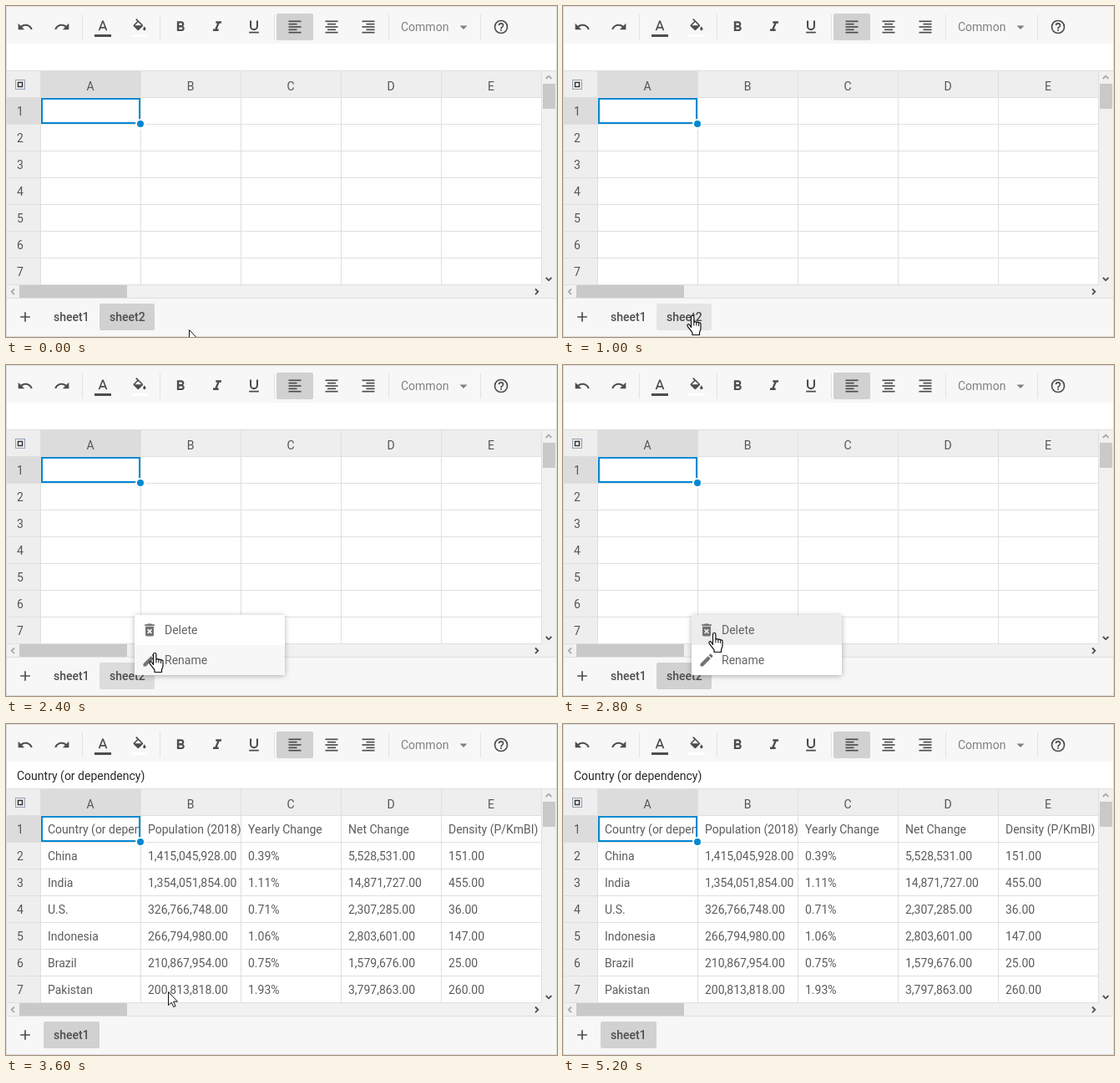
An HTML page for the animation above (6 s loop, 660 by 396 pixels).

```html
<!DOCTYPE html>
<html lang="en">
<head>
<meta charset="utf-8">
<title>Removing a sheet</title>
<style>
  html, body { margin: 0; width: 100%; height: 100%; overflow: hidden; background: #f7f7f7; }
  svg { display: block; width: 660px; height: 396px; font: 14px Roboto, Arial, sans-serif; }
  .tab { font-weight: 500; fill: #4d4d4d; }
  .shadow { filter: drop-shadow(0 1px 3px rgba(0, 0, 0, .3)); }
</style>
</head>
<body>
<svg id="stage" viewBox="0 0 660 396"></svg>
<script>
const stage = document.getElementById("stage");
const INK = "#4d4d4d", LINE = "#dfdfdf", ACTIVE = "#d1d1d1", BLUE = "#0288d1";

function add(parent, tag, attrs, text) {
  const el = document.createElementNS("http://www.w3.org/2000/svg", tag);
  for (const key in attrs) el.setAttribute(key, attrs[key]);
  if (text !== undefined) el.textContent = text;
  parent.appendChild(el);
  return el;
}
const group = (parent = stage) => add(parent, "g", {});
const rect = (x, y, width, height, fill, parent = stage, rx = 0) =>
  add(parent, "rect", { x, y, width, height, fill, rx });
const label = (x, y, text, fill, parent = stage, extra = {}) =>
  add(parent, "text", { x, y, fill, ...extra }, text);
const path = (d, attrs, parent = stage) => add(parent, "path", { d, ...attrs });

// 24-unit icons, drawn 20px wide around a centre point
const ICONS = {
  undo: "M12.5 8C9.85 8 7.45 9 5.6 10.6L2 7V16H11L7.38 12.38C8.77 11.22 10.54 10.5 12.5 10.5C16.04 10.5 19.05 12.81 20.1 16L22.47 15.22C21.08 11.03 17.15 8 12.5 8Z",
  letter: "M9.62 12L12 5.67L14.37 12M11 3L5.5 17H7.75L8.87 14H15.12L16.25 17H18.5L13 3H11Z",
  fill: "M19 11.5C19 11.5 17 13.67 17 15A2 2 0 0 0 21 15C21 13.67 19 11.5 19 11.5M5.21 10L10 5.21L14.79 10M16.56 8.94L7.62 0L6.21 1.41L8.59 3.79L3.44 8.94C2.85 9.5 2.85 10.47 3.44 11.06L8.94 16.56C9.5 17.1 10.5 17.1 11.06 16.56L16.56 11.06C17.15 10.5 17.15 9.5 16.56 8.94Z",
  bold: "M13.5 15.5H10V12.5H13.5A1.5 1.5 0 0 1 13.5 15.5M10 6.5H13A1.5 1.5 0 0 1 13 9.5H10M15.6 10.79C16.57 10.11 17.25 9 17.25 8C17.25 5.74 15.5 4 13.25 4H7V18H14.04C16.14 18 17.75 16.3 17.75 14.21C17.75 12.69 16.89 11.39 15.6 10.79Z",
  italic: "M10 4V7H12.21L8.79 15H6V18H14V15H11.79L15.21 7H18V4H10Z",
  underline: "M5 21H19V19H5V21M12 17A6 6 0 0 0 18 11V3H15.5V11A3.5 3.5 0 0 1 8.5 11V3H6V11A6 6 0 0 0 12 17Z",
  help: "M11 18H13V16H11V18M12 2A10 10 0 0 0 12 22A10 10 0 0 0 12 2M12 20A8 8 0 0 1 12 4A8 8 0 0 1 12 20M12 6A4 4 0 0 0 8 10H10A2 2 0 0 1 14 10C14 12 11 11.75 11 15H13C13 12.75 16 12.5 16 10A4 4 0 0 0 12 6Z",
  plus: "M19 13H13V19H11V13H5V11H11V5H13V11H19V13Z",
  trash: "M6 19A2 2 0 0 0 8 21H16A2 2 0 0 0 18 19V7H6V19M8.46 11.88L9.87 10.47L12 12.59L14.12 10.47L15.53 11.88L13.41 14L15.53 16.12L14.12 17.53L12 15.41L9.88 17.53L8.47 16.12L10.59 14L8.46 11.88M15.5 4L14.5 3H9.5L8.5 4H5V6H19V4H15.5Z",
  pencil: "M20.71 7.04C21.1 6.65 21.1 6 20.71 5.63L18.37 3.29C18 2.9 17.35 2.9 16.96 3.29L15.12 5.12L18.87 8.87M3 17.25V21H6.75L17.81 9.93L14.06 6.18L3 17.25Z"
};
function icon(name, cx, cy, fill = INK, parent = stage, flip = 1) {
  const s = 20 / 24;
  path(ICONS[name], {
    fill, "fill-rule": "evenodd",
    transform: `translate(${cx} ${cy}) scale(${s * flip} ${s}) translate(-12 -12)`
  }, parent);
}

function drawToolbar() {
  rect(0, 0, 660, 396, "#f7f7f7");
  rect(324, 9, 44, 32, ACTIVE, stage, 2);
  icon("undo", 23, 25);
  icon("undo", 67, 25, INK, stage, -1);
  icon("letter", 116, 25);
  rect(106, 34, 20, 3, INK);
  icon("fill", 160, 25);
  rect(150, 34, 20, 3, "#fff");
  icon("bold", 209, 25);
  icon("italic", 253, 25);
  icon("underline", 297, 25);
  [[346, 0], [390, .5], [434, 1]].forEach(([cx, align]) => {
    for (let i = 0; i < 5; i++) {
      const w = i % 2 ? 10 : 15;
      rect(cx - 7.5 + (15 - w) * align, 17.5 + i * 3.333, w, 1.667, INK);
    }
  });
  for (const x of [91, 184, 321, 458, 568]) rect(x, 10, 1, 30, "#e2e2e2");
  label(473, 30, "Common", "#808080");
  path("M543.5 23.5h9l-4.5 4.5z", { fill: "#808080" });
  icon("help", 593, 25);
}

function drawGrid() {
  rect(0, 45, 660, 32, "#fff");
  rect(0, 77, 660, 1, LINE);
  rect(1, 78, 641, 256, "#eee");
  rect(42, 110, 600, 224, "#fff");
  rect(42, 78, 119, 31, "#dcdcdc");
  rect(1, 110, 40, 31, "#dcdcdc");
  for (let x = 41; x < 650; x += 120) rect(x, 78, 1, 256, LINE);
  for (let y = 109; y < 340; y += 32) rect(1, y, 641, 1, LINE);
  const middle = { "text-anchor": "middle" };
  [..."ABCDE"].forEach((c, i) => label(101 + i * 120, 101, c, "#555", stage, middle));
  for (let i = 0; i < 7; i++) label(17, 131 + i * 32, i + 1, "#555", stage, middle);
  add(stage, "rect", { x: 11.5, y: 88.5, width: 11, height: 11, fill: "none", stroke: "#34507c", "stroke-dasharray": "1 1" });
  add(stage, "rect", { x: 14.5, y: 91.5, width: 5, height: 5, fill: "#fff", stroke: "#333", "stroke-width": 1.5 });
}

function drawData() {
  const data = group();
  label(13, 67, "Country (or dependency)", "#262626", data);
  [
    ["Country (or dependency)", "Population (2018)", "Yearly Change", "Net Change", "Density (P/KmBI)"],
    ["China", "1,415,045,928.00", "0.39%", "5,528,531.00", "151.00"],
    ["India", "1,354,051,854.00", "1.11%", "14,871,727.00", "455.00"],
    ["U.S.", "326,766,748.00", "0.71%", "2,307,285.00", "36.00"],
    ["Indonesia", "266,794,980.00", "1.06%", "2,803,601.00", "147.00"],
    ["Brazil", "210,867,954.00", "0.75%", "1,579,676.00", "25.00"],
    ["Pakistan", "200,813,818.00", "1.93%", "3,797,863.00", "260.00"]
  ].forEach((row, r) => row.forEach((text, c) => {
    const cell = add(data, "svg", { x: 42 + c * 120, y: 110 + r * 32, width: 119, height: 31 });
    label(8, 21, text, "#5c5c5c", cell);
  }));
  return data;
}

function drawSelection() {
  add(stage, "rect", { x: 43, y: 111, width: 117, height: 29, fill: "none", stroke: BLUE, "stroke-width": 2 });
  add(stage, "circle", { cx: 161, cy: 141, r: 5, fill: BLUE, stroke: "#fff", "stroke-width": 2 });
}

function drawScrollbars() {
  rect(642, 78, 17, 272, "#f1f1f1");
  rect(1, 334, 641, 16, "#f1f1f1");
  rect(643, 93, 15, 30, "#c9c9c9");
  rect(16, 334, 129, 15, "#c9c9c9");
  const chevron = (d, stroke) => path(d, { fill: "none", stroke, "stroke-width": 1.8 });
  chevron("M10 338.5l-3.3 3.3 3.3 3.3", "#a8a8a8");
  chevron("M634 338.5l3.3 3.3-3.3 3.3", INK);
  chevron("M646.8 87l3.3-3.3 3.3 3.3", "#a8a8a8");
  chevron("M646.8 325l3.3 3.3 3.3-3.3", INK);
  rect(0, 349, 660, 1, LINE);
}

function drawTabs() {
  const first = rect(45, 356, 67, 32, ACTIVE, stage, 2);
  const second = group();
  const back = rect(112, 356, 66, 32, ACTIVE, second, 2);
  icon("plus", 23, 372);
  label(57, 377, "sheet1", INK, stage, { class: "tab" });
  label(124, 377, "sheet2", INK, second, { class: "tab" });
  return { first, second, back };
}

function drawMenu() {
  const box = group();
  rect(154, 299, 180, 72, "#fff", box, 2).setAttribute("class", "shadow");
  const rows = [["Delete", "trash"], ["Rename", "pencil"]].map(([text, name], i) => {
    const back = rect(154, 299 + i * 36, 180, 36, "#fff", box, 2);
    icon(name, 172, 317 + i * 36, "#737373", box);
    label(190, 322 + i * 36, text, "#636363", box);
    return back;
  });
  return { box, rows };
}

function drawCursors() {
  const outline = { fill: "#fff", stroke: "#111", "stroke-linejoin": "round" };
  const arrow = group(), hand = group();
  path("M.5.5V16.5L4.2 13.1 6.8 18.5 9 17.6 6.6 12.1H11.5Z", outline, arrow);
  path("M5.5 14.5V2.2a1.7 1.7 0 0 1 3.4 0V8.5a1.6 1.6 0 0 1 3 .3 1.5 1.5 0 0 1 2.7.6 1.4 1.4 0 0 1 2.4 1.1V16c0 2-1.5 3.3-1.5 5V23.5H7V21C5.7 18.5 2.8 15.5 1.2 13.2 0 11.2 2.2 10 3.4 11.4Z",
    { ...outline, "stroke-width": 1.2 }, hand);
  path("M8.9 8.5v4M11.9 9v3.5M14.6 9.8V13", { fill: "none", stroke: "#111" }, hand);
  return { arrow, hand };
}

drawToolbar();
drawGrid();
const data = drawData();
drawSelection();
drawScrollbars();
const tabs = drawTabs();
const menu = drawMenu();
add(stage, "rect", { x: .5, y: .5, width: 659, height: 395, fill: "none", stroke: "#dcdcdc" });
const cursors = drawCursors();

// time, cursor, x, y, then changes that stay until replaced
const LOOP = 6000;
const STEPS = [
  [0, "arrow", 219, 387, { tab: ACTIVE, menu: false, del: "#fff", ren: "#fff", loaded: false }],
  [200, "arrow", 225, 377],
  [400, "arrow", 216, 367],
  [600, "arrow", 200, 366],
  [800, "arrow", 180, 366],
  [1000, "hand", 148, 370, { tab: "#e5e5e5" }],
  [2000, "hand", 148, 370, { tab: ACTIVE, menu: true }],
  [2200, "hand", 148, 370, { tab: "#e5e5e5" }],
  [2400, "hand", 171, 344, { tab: "#dcdcdc", ren: "#f7f7f7" }],
  [2600, "hand", 173, 327, { tab: ACTIVE, ren: "#fff", del: "#ededed" }],
  [2800, "hand", 174, 320],
  [3400, "arrow", 194, 320],
  [3600, "arrow", 194, 320, { menu: false, loaded: true }],
  [4600, "arrow", 194, 321],
  [4800, "arrow", 181, 347],
  [5000, "arrow", 165, 389],
  [5200, "none", 0, 0]
];
const show = (el, on) => el.setAttribute("visibility", on ? "visible" : "hidden");

function render(time) {
  const past = STEPS.filter(step => step[0] <= time);
  const state = Object.assign({}, ...past.map(step => step[4]));
  const [, cursor, x, y] = past[past.length - 1];
  show(data, state.loaded);
  show(tabs.first, state.loaded);
  show(tabs.second, !state.loaded);
  show(menu.box, state.menu);
  tabs.back.setAttribute("fill", state.tab);
  menu.rows[0].setAttribute("fill", state.del);
  menu.rows[1].setAttribute("fill", state.ren);
  for (const name in cursors) {
    show(cursors[name], name === cursor);
    cursors[name].setAttribute("transform", `translate(${x} ${y})`);
  }
}

const start = performance.now();
function tick() {
  render((performance.now() - start) % LOOP);
  requestAnimationFrame(tick);
}
tick();
</script>
</body>
</html>
```
